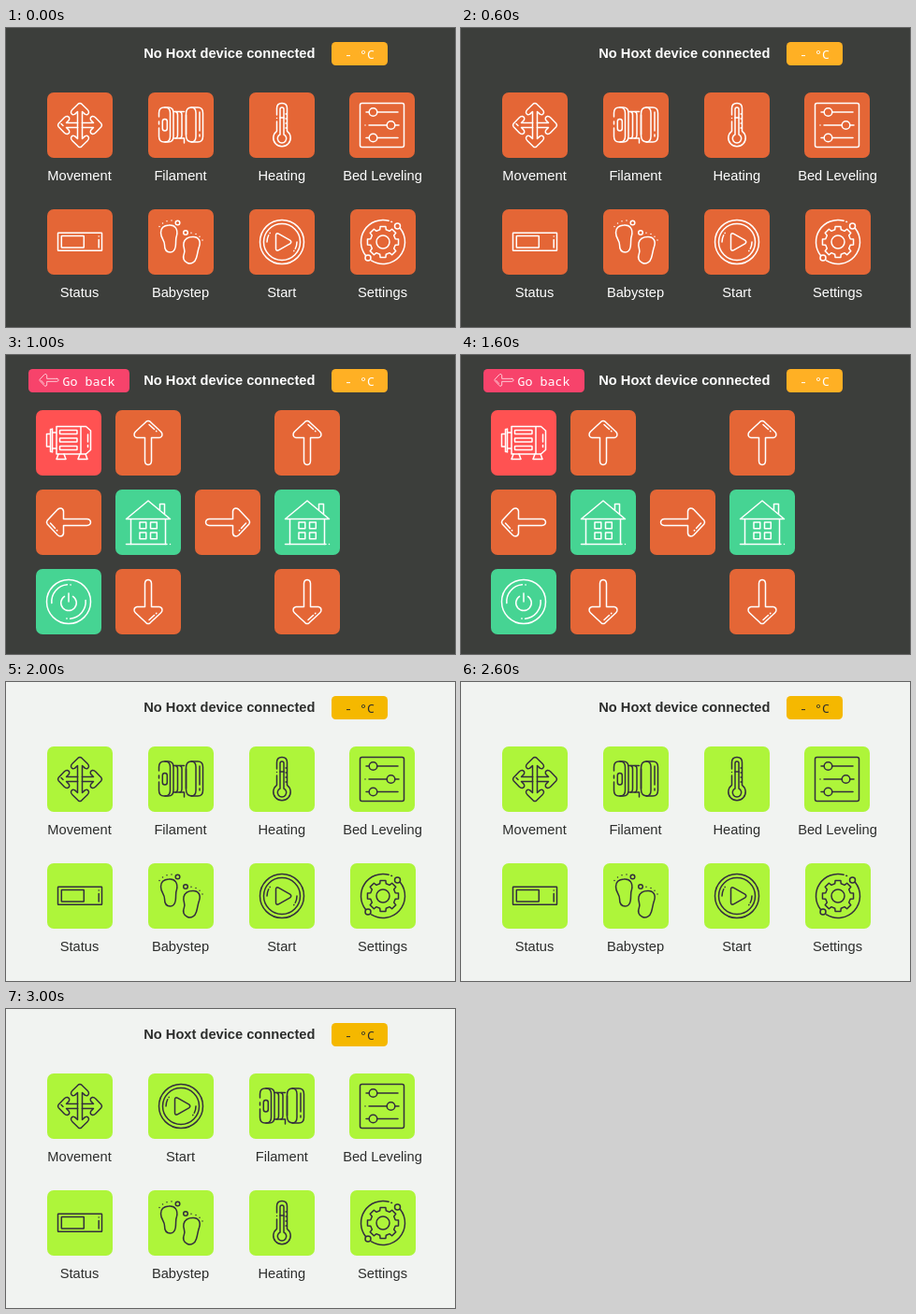
An HTML page that plays this animation: 480 px wide and 320 px high, repeating every 4000 ms.

```html
<!DOCTYPE html>
<html lang="en">
<head>
<meta charset="utf-8">
<title>Printer panel</title>
<style>
html, body { margin: 0; width: 100%; height: 100%; overflow: hidden; }
svg { display: block; width: 480px; height: 320px; }
text { font: 14.67px "Liberation Sans", Arial, sans-serif; }
.title { font-weight: bold; }
.mono { font: 13.33px "Noto Sans Mono", "DejaVu Sans Mono", monospace; white-space: pre; }
.icon { fill: none; stroke-width: 1.5; stroke-linecap: round; stroke-linejoin: round; }
</style>
</head>
<body>
<svg id="stage" viewBox="0 0 480 320"></svg>
<script>
const stage = document.getElementById('stage');
const LOOP = 4000, STEP = 1000;

const dark = { bg: '#3c3e3b', tile: '#e46636', line: '#ffffff', text: '#ffffff', pill: '#ffb024' };
const light = { bg: '#f1f3f1', tile: '#aef53a', line: '#332f3d', text: '#2c2d2c', pill: '#f5b800' };

// Shape helpers; every icon lives in a 70 x 70 tile centred on 35,35.
const path = (d, extra = '') => `<path d="${d}" ${extra}/>`;
const circle = (x, y, r) => `<circle cx="${x}" cy="${y}" r="${r}"/>`;
const rect = (x, y, w, h, r = 0) => `<rect x="${x}" y="${y}" width="${w}" height="${h}" rx="${r}"/>`;
const dots = list => list.map(([x, y]) => path(`M${x} ${y}h.01`)).join('');
const polar = (r, deg) => {
  const a = deg * Math.PI / 180;
  return `${(35 + r * Math.cos(a)).toFixed(2)} ${(35 + r * Math.sin(a)).toFixed(2)}`;
};
const arc = (r, from, to) =>
  path(`M${polar(r, from)}A${r} ${r} 0 ${to - from > 180 ? 1 : 0} 1 ${polar(r, to)}`);

function gear(teeth) {
  const pts = [], pitch = 360 / teeth;
  for (let i = 0; i < teeth; i++) {
    const a = i * pitch;
    pts.push(polar(13.6, a - 14), polar(16.8, a - 10), polar(16.8, a + 10), polar(13.6, a + 14));
  }
  return path('M' + pts.join('L') + 'Z');
}

function movement() {
  const head = 'M-2.5 -2.5V-14.5L-5.6 -11.6Q-8.6 -10.4 -9.5 -13.4Q-9.7 -15.2 -8 -16.8' +
    'L-1.8 -22.8Q0 -24.2 1.8 -22.8L8 -16.8Q9.7 -15.2 9.5 -13.4Q8.6 -10.4 5.6 -11.6L2.5 -14.5V-2.5';
  const arms = [0, 90, 180, 270].map(a => path(head, `transform="translate(35 35) rotate(${a})"`));
  return arms.join('') + path('M32.5 32.5v5M37.5 32.5v5M15 33.5l2 2');
}

const arrowShape =
  path('M31.5 54.5V29.5H23Q19.5 28.8 20.2 25Q20.6 24 21.5 23L33 12.2Q35 10.7 37 12.2' +
    'L48.5 23Q49.4 24 49.8 25Q50.5 28.8 47 29.5H38.5V54.5Q38.3 58.3 35 58.5Q31.7 58.3 31.5 54.5Z') +
  path('M36 15.5l5.5 5M43.5 22.3l.4 .4');
const turned = how => `<g transform="translate(35 35) ${how} translate(-35 -35)">${arrowShape}</g>`;

const icons = {
  movement: movement(),

  filament:
    path('M11.5 26V22Q11.5 16 17 16H18Q23.5 16 23.5 22V47Q23.5 53 18 53H17Q11.5 53 11.5 47V38M11.5 31v3') +
    rect(15.3, 28.5, 5, 12.5, 2.5) +
    path('M18 16H21.5Q27 16 27 22V47Q27 53 21.5 53H18') +
    path('M27 20.5H29Q31.5 20.5 31.5 24V45Q31.5 49 29 49H27') +
    path('M29.5 20.5H33.5Q36 20.5 36 24V45Q36 49 33.5 49H29.5') +
    path('M34 20.5H38.5M34 49H38M38.5 49v5M40.5 24V45') +
    path('M47 53Q40.5 53 40.5 46V23Q40.5 16 46 16Q51 16 51 22V47Q51 53 46 53') +
    path('M46 16H53Q58.5 16 58.5 22V47Q58.5 53 53 53H46') +
    path('M55 21V41M55 45v2'),

  heating:
    path('M29.5 24V17Q29.5 11.5 35 11.5Q40.5 11.5 40.5 17V41.3A9.2 9.2 0 1 1 29.5 41.3V31M29.5 27.5h.01') +
    path('M33 45V18Q33 16 35 16Q37 16 37 18V45A4.7 4.7 0 1 1 33 45Z') +
    path('M33 27H37M40 23h-1M40 28h-1M40 33h-1M40 38h-1'),

  bed:
    rect(11.5, 11.5, 47, 47, 2) +
    circle(25.5, 21, 4.3) + circle(44.5, 35, 4.3) + circle(25.5, 48.5, 4.3) +
    path('M18 21h3M30 21H52M17 35h.01M21 35H40M49 35H53M18 48.5h3M30 48.5H52'),

  status:
    rect(11.5, 25.3, 47, 19, .5) + rect(15.3, 28.5, 24, 12.5, .5) +
    path('M55.2 29h.01M55.2 32.5V41'),

  steps:
    path('M22 17C29 16 32 22 30.5 28C29 32 30 35 29.2 40C28.5 44 26 46 23.5 46' +
      'C19 46 17.5 43 17.5 38C17.5 33 13.5 31 13.5 25C13.5 20 17 17.3 22 17Z') +
    path('M48 29.5C54 29.5 56.5 34 54.5 40C53 44 53 47 51.5 52C50 57 46 59 42 57.5' +
      'C38 56 36.5 52 38.5 47C40 43 37 41 38 36C39 32 43 29.5 48 29.5Z') +
    circle(31.5, 14.5, 2.3) + circle(40, 25, 2.3) +
    dots([[12, 18.5], [15.5, 15], [20, 12.7], [25, 12], [46, 25.2], [51, 26.5], [55, 29.2], [58, 33]]),

  start:
    circle(35, 35, 23.5) + circle(35, 35, 19.5) +
    path('M28.5 29V28Q28.5 25 31.3 26.2L43.6 33.2Q46 35 43.6 36.8L31.3 43.8Q28.5 45 28.5 42Z') +
    arc(16, 180, 207) + arc(16, 216, 217) + arc(16, 0, 27) + arc(16, 36, 37),

  settings:
    gear(8) + circle(35, 35, 7) + circle(50.5, 18, 3) + circle(19, 52, 3) +
    arc(23.5, -38, 122) + arc(23.5, 142, 285) + arc(23.5, 292, 294),

  up: turned(''),
  down: turned('scale(1 -1)'),
  right: turned('rotate(90)'),
  left: turned('scale(-1 1) rotate(90)'),

  motor:
    path('M17.5 20V45M17.5 20.5H15.5V26M15.5 39V44.5H17.5M15.5 25.5H11.5V39H15.5V25.5') +
    path('M22 17.5H48V47H22ZM48 17.5H53.5L58.5 22V42.5L53.5 47H48M17.5 24H22M17.5 41H22') +
    rect(25.5, 21.5, 18.5, 4, .5) + rect(25.5, 30, 18.5, 4, .5) + rect(25.5, 38.5, 18.5, 4, .5) +
    path('M24 47L22 52.5H32L30 47M47 47L45 52.5H55L53 47M55.5 26V34M55.5 37.5v2'),

  house:
    path('M35 12L11.5 31.5H58.5ZM16.5 31.5V58.5M53.5 31.5V58.5M47.5 22V15.5H52.5V26') +
    [[26, 35], [37.5, 35], [26, 46], [37.5, 46]].map(([x, y]) => rect(x, y, 6.8, 6.8)).join('') +
    path('M11.5 58.5H55M58.5 58.5h.01'),

  power:
    circle(35, 35, 23.5) +
    arc(18.2, 175, 265) + arc(18.2, 276, 277) + arc(18.2, -5, 85) + arc(18.2, 96, 97) +
    path('M30.5 29.3A8.3 8.3 0 1 0 39.5 29.3M35 26V35')
};

const label = (s, x, y, color) =>
  `<text x="${x}" y="${y}" text-anchor="middle" fill="${color}">${s}</text>`;
const tile = (icon, x, y, fill, line) =>
  `<g transform="translate(${x} ${y})"><rect width="70" height="70" rx="7" fill="${fill}"/>` +
  `<g class="icon" stroke="${line}">${icons[icon]}</g></g>`;

const header = c =>
  `<rect width="480" height="320" fill="${c.bg}"/>` +
  `<text class="title" x="147.2" y="32" fill="${c.text}">No Hoxt device connected</text>` +
  `<rect x="348" y="15" width="60" height="25" rx="4.5" fill="${c.pill}"/>` +
  `<text class="mono" x="362" y="33" fill="${c.text}">- °C</text>`;

const names = {
  movement: 'Movement', filament: 'Filament', heating: 'Heating', bed: 'Bed Leveling',
  status: 'Status', steps: 'Babystep', start: 'Start', settings: 'Settings'
};
const columns = [78.5, 186.5, 294.8, 402.5];

function menu(c, order) {
  return header(c) + order.map((key, i) => {
    const col = i % 4, row = i >> 2;
    const x = 44 + col * 108 - (key === 'bed' ? 1 : 0), y = 69 + row * 125;
    return tile(key, x, y, c.tile, c.line) + label(names[key], columns[col], y + 94, c.text);
  }).join('');
}

function jog(c) {
  const fills = { motor: '#ff5252', house: '#46d493', power: '#46d493' };
  const grid = [
    ['motor', 'up', '', 'up'],
    ['left', 'house', 'right', 'house'],
    ['power', 'down', '', 'down']
  ];
  const tiles = grid.map((row, j) => row.map((key, i) =>
    key && tile(key, 32 + i * 85, 59 + j * 85, fills[key] || c.tile, c.line)).join('')).join('');
  return header(c) +
    '<rect x="24" y="15" width="108" height="25" rx="4.5" fill="#f7436b"/>' +
    `<g class="icon" stroke="#ffdce4" style="stroke-width:2" transform="translate(31 11.8) scale(.43)">${icons.left}</g>` +
    `<text class="mono" x="60.5" y="33" fill="${c.text}">Go back</text>` + tiles;
}

const usual = ['movement', 'filament', 'heating', 'bed', 'status', 'steps', 'start', 'settings'];
const sorted = ['movement', 'start', 'filament', 'bed', 'status', 'steps', 'heating', 'settings'];
const scenes = [menu(dark, usual), jog(dark), menu(light, usual), menu(light, sorted)];

let shown = -1;
function draw(ms) {
  const index = Math.floor((ms % LOOP) / STEP);
  if (index === shown) return;
  shown = index;
  stage.innerHTML = scenes[index];
}

const begin = performance.now();
function tick() {
  draw(performance.now() - begin);
  requestAnimationFrame(tick);
}
tick();
</script>
</body>
</html>
```
